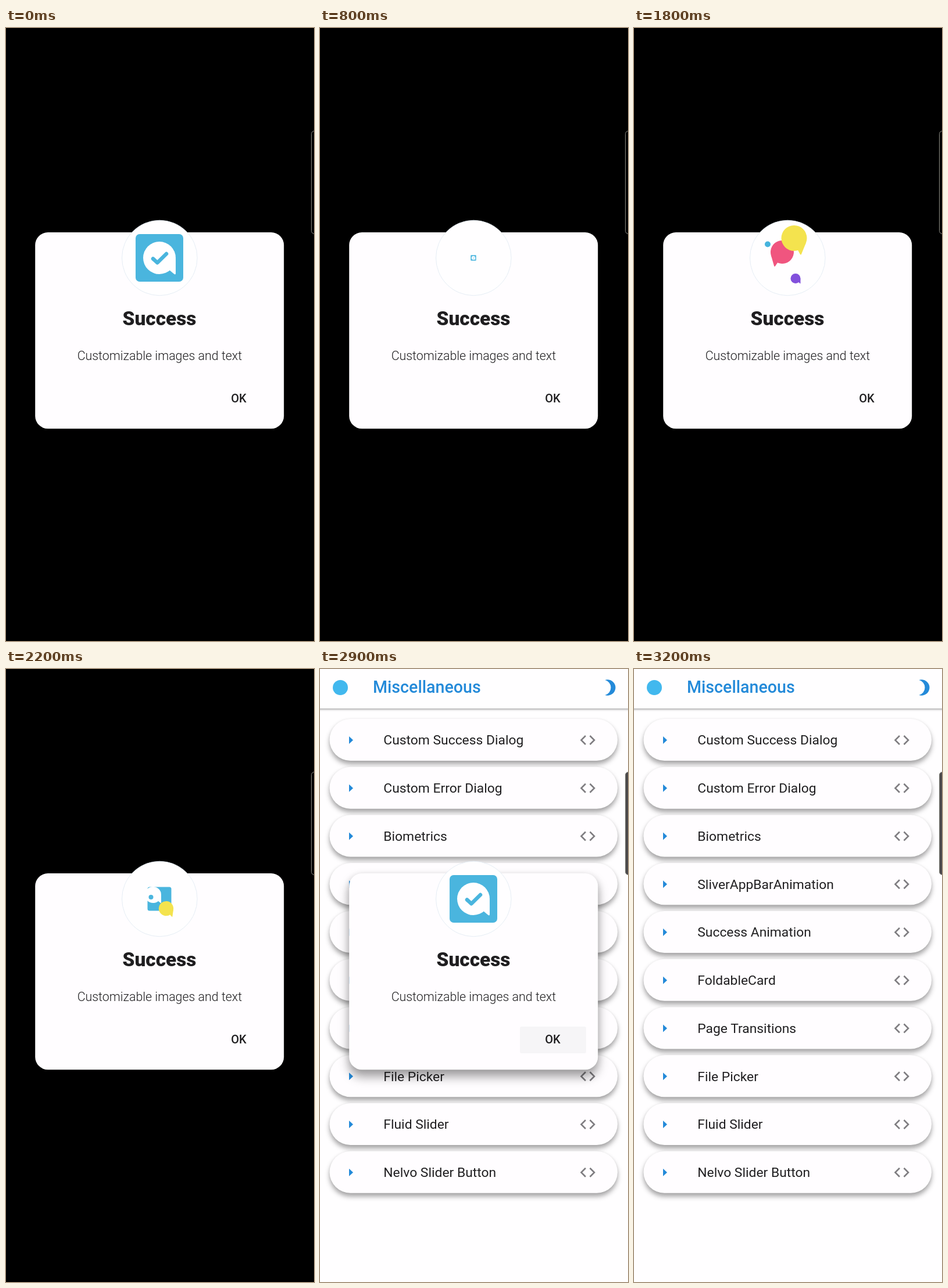
Write an HTML page that moves like this. It is 530 px wide and 1056 px high and loops after 3300 ms.

```html
<!DOCTYPE html>
<html lang="en">
<head>
<meta charset="utf-8">
<style>
  html, body { margin: 0; width: 100%; height: 100%; overflow: hidden; background: #000; }
  svg { display: block; width: 530px; height: 1056px; font-family: Roboto, sans-serif; }
  .row { fill: #fffdff; filter: drop-shadow(0 6px 4px #0005) drop-shadow(0 0 2px #0001); }
  .bar { fill: #fffeff; filter: drop-shadow(0 1px 2px #0007); }
  .card { fill: #fffdff; filter: drop-shadow(0 12px 9px #0005) drop-shadow(0 2px 6px #0002); }
  .accent { fill: #248ad9; }
  .label { font-size: 22.85px; fill: #201f21; }
  .code { fill: none; stroke: #7f7d81; stroke-width: 2.6; }
</style>
</head>
<body>
<svg viewBox="0 0 530 1056">
  <defs>
    <g id="bubble"><circle r="1"/><path d="M1 0V.95Q1 1.06 .9 .99L.55 .7Z"/></g>
    <circle id="ball" r="1"/>
  </defs>
  <rect width="530" height="1056"/>
  <g id="page">
    <rect width="530" height="1056" fill="#fffeff"/>
    <rect class="bar" x="-5" y="-5" width="540" height="73"/>
    <circle cx="35" cy="32" r="13" fill="#42b8ee"/>
    <text class="accent" x="91" y="40.5" font-size="28.6" font-weight="500">Miscellaneous</text>
    <path class="accent" d="M490.5 19A13.7 13.7 0 1 1 490.5 45A13.45 13.45 0 0 0 490.5 19"/>
    <g id="rows"></g>
  </g>
  <rect id="handle" x="525.5" y="177.5" width="20" height="177" rx="5" stroke="#8a8a82"/>
  <g id="dialog">
    <rect class="card" x="50.2" y="352" width="428" height="338.3" rx="22"/>
    <circle cx="264.3" cy="396" r="64.8" fill="#fffeff" stroke="#dfe9f2" stroke-width=".8"/>
    <g id="icon">
      <rect x="-41" y="-41" width="82" height="82" rx="7" fill="#4ab5de"/>
      <g id="badge">
        <use href="#bubble" transform="scale(28)" fill="#fffeff"/>
        <circle id="dot" r="8" fill="#4ab5de"/>
        <path id="check" d="M-11 1.5L-3.5 8.3L12-7" fill="none" stroke="#4ab5de" stroke-width="6.5" stroke-linecap="round" stroke-linejoin="round"/>
      </g>
    </g>
    <g id="bubbles"></g>
    <g fill="#1f1e20">
      <text x="264" y="511.8" font-size="33.4" font-weight="800" text-anchor="middle">Success</text>
      <text x="264.4" y="571.8" font-size="21.4" font-weight="300" text-anchor="middle">Customizable images and text</text>
      <rect id="press" x="344" y="616" width="114" height="46" rx="3" fill="#f6f5f7"/>
      <text x="400.5" y="645.3" font-size="20" font-weight="500" text-anchor="middle">OK</text>
    </g>
  </g>
</svg>
<script>
const LOOP = 3300, STEP = 100;
const $ = id => document.getElementById(id);
const place = (el, value) => el.setAttribute('transform', value);
const ramp = (t, from, to) => Math.min(1, Math.max(0, (t - from) / (to - from)));
const ease = (t, from, to) => { const u = ramp(t, from, to); return u * u * (3 - 2 * u); };

const labels = ['Custom Success Dialog', 'Custom Error Dialog', 'Biometrics', 'SliverAppBarAnimation',
  'Success Animation', 'FoldableCard', 'Page Transitions', 'File Picker', 'Fluid Slider', 'Nelvo Slider Button'];
$('rows').innerHTML = labels.map((label, i) => `
  <g transform="translate(0 ${86 + 82.75 * i})">
    <rect class="row" x="16.5" width="495.5" height="72" rx="36"/>
    <path class="accent" d="M50 30L57 36.5L50 43Z"/>
    <text class="label" x="109.3" y="44.3">${label}</text>
    <path class="code" d="M457 29L449.5 36.5L457 44M464.5 29L472 36.5L464.5 44"/>
  </g>`).join('');

// x and y are the offsets from the icon's centre when fully spread
const bubbles = [
  { color: '#f0557f', x: -9, y: -10, r: 20, tilt: -16, flip: -1, end: 2200 },
  { color: '#8250dc', x: 14, y: 35.5, r: 8.5, tilt: 0, flip: 1, end: 2200 },
  { color: '#46b4de', x: -34, y: -23.5, r: 5, tilt: 0, flip: 1, end: 2200, shape: 'ball' },
  { color: '#f4e34e', x: 11.5, y: -34, r: 22, tilt: 22, flip: 1, end: 2360 }
];
for (const b of bubbles) {
  b.el = document.createElementNS('http://www.w3.org/2000/svg', 'use');
  b.el.setAttribute('href', '#' + (b.shape || 'bubble'));
  b.el.setAttribute('fill', b.color);
  $('bubbles').append(b.el);
}

// Bubbles fly out, then swing through the centre line while shrinking
function drawBubble(b, t) {
  const grow = ease(t, 1000, 1800), fall = ramp(t, 1900, b.end);
  const size = grow * (1 - fall * fall);
  const swing = Math.cos(Math.PI * Math.max(0, t - 1800) / 485);
  place(b.el, `translate(${264 + b.x * grow} ${396 + b.y * size * swing})
    rotate(${b.tilt * (1 - fall)}) scale(${b.r * size * b.flip} ${b.r * size})`);
}

function drawIcon(t) {
  const leaving = t < 1000;
  const settle = leaving ? 1 : ease(t, 2000, 2400);
  const checked = leaving ? 1 : ease(t, 2200, 2500);
  place($('icon'), `translate(264 396) scale(${1 - ease(t, 500, 880) + ease(t, 2000, 2400)})`);
  place($('badge'), `translate(${-44 * (1 - settle)} ${-28 * (1 - settle)})`);
  place($('dot'), `translate(-7 8) scale(${1 - checked})`);
  place($('check'), `scale(${checked})`);
}

function draw() {
  const t = Math.floor(performance.now() % LOOP / STEP) * STEP;
  const light = t >= 2900;
  $('page').style.display = $('press').style.display = light ? '' : 'none';
  $('handle').setAttribute('fill', light ? '#4b494b' : '#000');
  $('dialog').style.opacity = 1 - ramp(t, 2900, 3100);
  drawIcon(t);
  bubbles.forEach(b => drawBubble(b, t));
  requestAnimationFrame(draw);
}
draw();
</script>
</body>
</html>
```
